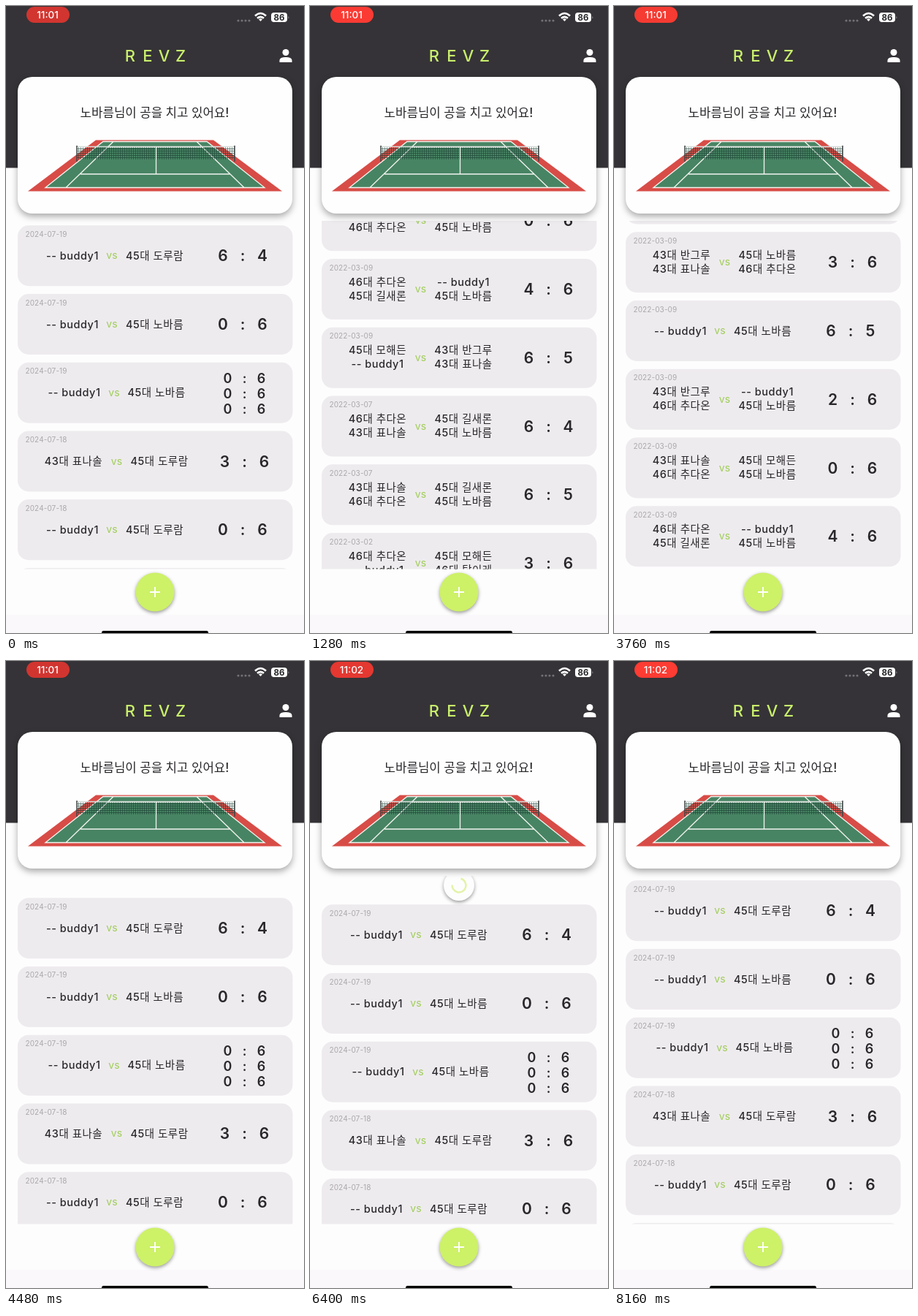
An HTML page that plays this animation: 408 by 858 pixels, repeating every 8.24 s.

```html
<!DOCTYPE html>
<html lang="ko">
<head>
<meta charset="utf-8">
<style>
  html, body { margin: 0; width: 100%; height: 100%; overflow: hidden; background: #fdfdfd; }
  svg { display: block; width: 408px; height: 858px; }
  text { font-family: Inter, "Noto Sans CJK KR", "Noto Sans CJK", sans-serif; text-anchor: middle; fill: #29272b; font-weight: 500; }
  .card { fill: #eeebee; }
  .date { font-size: 10px; font-weight: 400; text-anchor: start; fill: #aaa8ab; letter-spacing: .1px; }
  .player { font-size: 14.5px; letter-spacing: .5px; }
  .vs { font-size: 14px; font-weight: 400; fill: #9fcd58; }
  .score { font-size: 21px; font-weight: 600; }
  .small { font-size: 18px; }
  .panel { filter: drop-shadow(0 4px 5px #0005); }
  .round { filter: drop-shadow(0 2px 2.5px #0006); }
</style>
</head>
<body>
<svg viewBox="0 0 408 858">
  <defs>
    <clipPath id="viewport"><rect y="294" width="408" height="476.5"/></clipPath>
    <pattern id="mesh" width="3" height="3" patternUnits="userSpaceOnUse">
      <path d="M0 0H3M0 0V3" stroke="#183c30" stroke-width="1.3"/>
    </pattern>
  </defs>
  <rect width="408" height="858" fill="#fdfdfd"/>
  <rect y="833" width="408" height="25" fill="#faf8fb"/>
  <rect width="408" height="221.5" fill="#353337"/>

  <g clip-path="url(#viewport)">
    <g id="list"></g>
    <g id="spinner">
      <circle class="round" r="21" fill="#fdfdfd"/>
      <circle id="arc" r="9.5" fill="none" stroke="#d5ef7e" stroke-width="2.5" pathLength="360"/>
    </g>
  </g>

  <rect id="pill" x="28" y="1" width="59" height="22" rx="11"/>
  <text id="clock" x="57" y="17" font-size="13.5" style="fill:#fff"></text>
  <g fill="#737176">
    <circle cx="318" cy="20" r="1.6"/><circle cx="323" cy="20" r="1.6"/>
    <circle cx="328" cy="20" r="1.6"/><circle cx="333" cy="20" r="1.6"/>
  </g>
  <g fill="none" stroke="#fff" stroke-width="2.6">
    <path d="M341 13.5Q348.500 6.500 356 13.500M344 16.800Q348.500 12.800 353 16.800"/>
    <path d="M346 18.300Q348.500 16.300 351 18.300L348.500 21Z" fill="#fff" stroke="none"/>
  </g>
  <rect x="363" y="9" width="22" height="13" rx="4" fill="#fff"/>
  <path d="M386.500 13.500q1.500 2 0 4z" fill="#aaa"/>
  <text x="374" y="19.700" font-size="11.500" style="font-weight:700">86</text>
  <text x="170 194 216.500 239" y="75.800" font-size="22" style="fill:#c9ef6c">REVZ</text>
  <g fill="#fff"><circle cx="383" cy="63.500" r="4.500"/><path d="M374.500 77V74Q375 70 383 70T391.500 74V77Z"/></g>

  <rect class="panel" x="16" y="97" width="376" height="187" rx="20" fill="#fefefe"/>
  <text x="203.500" y="151.500" font-size="16.800">노바름님이 공을 치고 있어요!</text>
  <path d="M30 253.500L123 183.500H284L378 253.500Z" fill="#d84c47"/>
  <path d="M54 248.500L133 185H275L354 248.500Z" fill="#478463"/>
  <path d="M54 248.500L133 185.500H275L354 248.500ZM82 248.500L147 185.500M326 248.500L261 185.500M102 230H307M138 193H270M205.500 193V230" fill="none" stroke="#f2f5f0" stroke-width="1.300"/>
  <rect x="97" y="193" width="216" height="17" fill="url(#mesh)" opacity=".8"/>
  <path d="M96 192.500H314" stroke="#d9dfdc" stroke-width="1.500"/>
  <path d="M97 191V213M313 191V213" stroke="#414547" stroke-width="1.500"/>
  <path d="M205.500 193V210" stroke="#eef2ee" stroke-width="1.300"/>

  <circle class="round" cx="204" cy="802" r="26.500" fill="#cdf167"/>
  <path d="M197 802H211M204 795V809" stroke="#fff" stroke-width="1.800"/>
  <rect x="131" y="855" width="146" height="5" rx="2.500" fill="#000"/>
</svg>
<script>
const LOOP = 8240, STEP = 80, PITCH = 93.75, TOP = 300.25;
const $ = id => document.getElementById(id);

// date | left side | right side | sets
const newest = [
  '2024-07-19|-- buddy1|45대 도루람|6:4',
  '2024-07-19|-- buddy1|45대 노바름|0:6',
  '2024-07-19|-- buddy1|45대 노바름|0:6,0:6,0:6',
  '2024-07-18|43대 표나솔|45대 도루람|3:6',
  '2024-07-18|-- buddy1|45대 도루람|0:6',
];
const oldest = [
  '2022-03-09|43대 반그루,43대 표나솔|45대 노바름,46대 추다온|3:6',
  '2022-03-09|-- buddy1|45대 노바름|6:5',
  '2022-03-09|43대 반그루,46대 추다온|-- buddy1,45대 노바름|2:6',
  '2022-03-09|43대 표나솔,46대 추다온|45대 모해든,45대 노바름|0:6',
  '2022-03-09|46대 추다온,45대 길새론|-- buddy1,45대 노바름|4:6',
  '2022-03-09|45대 모해든,-- buddy1|43대 반그루,43대 표나솔|6:5',
  '2022-03-07|46대 추다온,43대 표나솔|45대 길새론,45대 노바름|6:4',
  '2022-03-07|43대 표나솔,46대 추다온|45대 길새론,45대 노바름|6:5',
  '2022-03-02|46대 추다온,-- buddy1|45대 모해든,46대 탁이레|3:6',
];
const pool = ['43대 표나솔', '46대 추다온', '45대 길새론', '43대 반그루', '45대 모해든'];
const middle = Array.from({ length: 7 }, (_, i) =>
  `2022-03-${16 - i}|${pool[i % 5]},${pool[(i + 1) % 5]}|${pool[(i + 2) % 5]},45대 노바름|${i * 2 % 6}:6`);

const text = (cls, x, y, value) => `<text class="${cls}" x="${x}" y="${y}">${value}</text>`;

function team(x, players) {
  const names = players.split(',');
  const first = names.length > 1 ? 36.5 : 46.7;
  return names.map((name, i) => text('player', x, first + i * 19.2, name)).join('');
}

function card(row, index) {
  const [date, left, right, result] = row.split('|');
  const sets = result.split(',');
  const many = sets.length > 1;
  const solo = left === '-- buddy1';
  const [leftX, vsX, rightX, scoreX] = many ? [93.5, 148, 206, 326.5]
    : solo ? [91, 145, 203.5, 324] : [92.5, 151.5, 210, 326.5];
  const gap = many ? 23 : 27;
  const cls = many ? 'score small' : 'score';
  const score = sets.map((set, i) => {
    const y = many ? 28 + i * 21 : 49;
    const [a, b] = set.split(':');
    return text(cls, scoreX - gap, y, a) + text(cls, scoreX, y, ':') + text(cls, scoreX + gap, y, b);
  }).join('');
  return `<g transform="translate(0 ${TOP + index * PITCH})">
    <rect class="card" x="16" width="376.500" height="83" rx="15"/>
    ${text('date', 26.5, 15.5, date)}${team(leftX, left)}${text('vs', vsX, 46, 'vs')}${team(rightX, right)}${score}</g>`;
}
$('list').innerHTML = [...newest, ...middle, ...oldest].map(card).join('');

const easeIn = u => u * u;
const easeOut = power => u => 1 - (1 - u) ** power;
const linear = u => u;

// time, scroll offset, easing towards it; negative offsets pull past the top
const scrollKeys = [
  [0, 0], [240, 300, easeIn], [1400, 1455.5, easeOut(3)], [1440, 1455.5, linear],
  [2160, 1436.5, easeOut(3)], [3300, 1436.5, linear],
  [3760, 1116, easeIn], [4280, 0, easeOut(1.5)],
  [4380, -35, easeOut(2)], [4960, 0, easeOut(2)], [6240, 0, linear],
  [6400, -33, linear], [6900, -90, easeOut(2)], [7060, -90, linear],
  [7500, 0, easeOut(3)], [LOOP, 0, linear],
];

function scrollAt(t) {
  const i = scrollKeys.findIndex(key => key[0] > t);
  const [t0, from] = scrollKeys[i - 1], [t1, to, ease] = scrollKeys[i];
  return from + (to - from) * ease((t - t0) / (t1 - t0));
}

function drawSpinner(t, pull) {
  const shown = t > 6240 && t < 7900;
  $('spinner').style.display = shown ? '' : 'none';
  if (!shown) return;
  const dragging = t < 6900;
  const y = 274 + (dragging ? Math.min(80, pull) : 80);
  const scale = Math.min(1, (7900 - t) / 200);
  const spin = Math.max(0, t - 7060);
  const sweep = dragging ? Math.min(265, pull * 7.8) : 150 + 115 * Math.cos(spin / 210);
  const turn = -75 + (dragging ? (pull - 33) * 2 : 94) + spin * .45;
  $('spinner').setAttribute('transform', `translate(204 ${y}) scale(${scale})`);
  $('arc').setAttribute('transform', `rotate(${turn})`);
  $('arc').setAttribute('stroke-dasharray', `${sweep} 360`);
  $('arc').setAttribute('opacity', dragging ? Math.min(1, .45 + pull / 150) : 1);
}

function draw(now) {
  const t = Math.floor(now % LOOP / STEP) * STEP;
  const scroll = scrollAt(t);
  $('list').setAttribute('transform', `translate(0 ${-scroll})`);
  drawSpinner(t, -scroll);
  const glow = .5 - .5 * Math.cos((t - 2240) / 2340 * 2 * Math.PI);
  $('pill').setAttribute('fill', `rgb(${209 + 45 * glow} ${53 + 7 * glow} ${48 + 3 * glow})`);
  $('clock').textContent = t < 5360 ? '11:01' : '11:02';
}

const start = performance.now();
function tick() {
  draw(performance.now() - start);
  requestAnimationFrame(tick);
}
tick();
</script>
</body>
</html>
```
